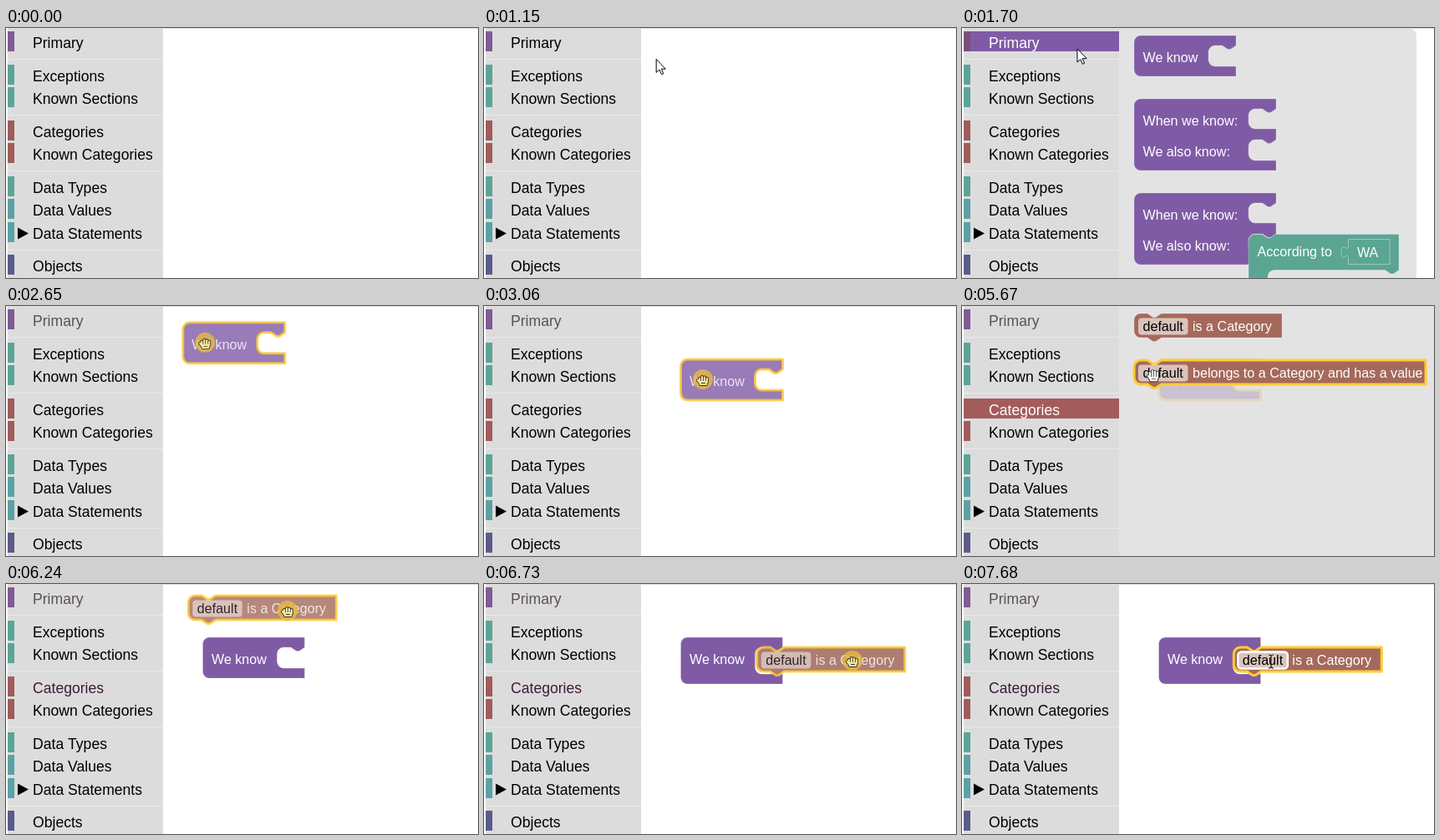
Recreate the animation shown at these times as an HTML page with a canvas. Size 565 px wide and 300 px high, loop 8000 ms.

```html
<!DOCTYPE html>
<html>
<head>
<meta charset="utf-8">
<style>
html, body { margin: 0; overflow: hidden; background: #fff; }
canvas { display: block; }
</style>
</head>
<body>
<canvas id="stage" width="565" height="300"></canvas>
<script>
const ctx = document.getElementById('stage').getContext('2d');
const LOOP = 8000;
const PURPLE = '#805ba5', BROWN = '#a5695b', GREEN = '#5ba593', YELLOW = '#fc3';
const MENU_FONT = '17.6px "Liberation Sans", Arial, sans-serif';
const BLOCK_FONT = '16.1px "Liberation Sans", Arial, sans-serif';

// label, top of row, colour of tab
const menu = [
  ['Primary', 4, '#805b94'],
  ['Exceptions', 44, '#5ba596'], ['Known Sections', 71, '#5ba596'],
  ['Categories', 111, '#a05b5b'], ['Known Categories', 138, '#a05b5b'],
  ['Data Types', 178, '#5ba596'], ['Data Values', 205, '#5ba2a5'], ['Data Statements', 233, '#5ba2a5'],
  ['Objects', 272, '#5b5b8a']
];

// time, x, y of the pointer
const route = [
  [600, 506, 92], [1360, 138, 25], [1970, 138, 25], [2310, 233, 35],
  [2520, 233, 35], [3000, 262, 89], [4120, 262, 89], [4610, 166, 121],
  [5400, 166, 121], [6030, 325, 28], [6239, 325, 28], [6240, 337, 33],
  [6700, 441, 93], [7000, 441, 93], [7300, 405, 58], [7640, 370, 93]
];

const within = (t, a, b) => t >= a && t < b;

function follow(t) {
  let i = 0;
  while (i < route.length - 1 && t >= route[i + 1][0]) i++;
  const a = route[i], b = route[i + 1] || a;
  let k = b === a ? 0 : (t - a[0]) / (b[0] - a[0]);
  k = Math.max(0, k);
  k = k * k * (3 - 2 * k);
  return { x: a[1] + (b[1] - a[1]) * k, y: a[2] + (b[2] - a[2]) * k };
}

function rect(x, y, w, h, color) {
  ctx.fillStyle = color;
  ctx.fillRect(x, y, w, h);
}

function text(s, x, y, color = '#fff', font = BLOCK_FONT) {
  ctx.font = font;
  ctx.fillStyle = color;
  ctx.fillText(s, x, y);
}

function at(x, y, draw) {
  ctx.save();
  ctx.translate(x, y);
  draw();
  ctx.restore();
}

// Block outline; holes are [top, bottom] pairs open to the right.
function outline(w, h, { left = 0, holes = [], top = false, tail = false }) {
  const p = new Path2D();
  p.moveTo(0, 8);
  p.arcTo(0, 0, 8, 0, 8);
  if (top) for (const [x, y] of [[16, 0], [22.6, 4.4], [25.9, 4.4], [32.5, 0]]) p.lineTo(x, y);
  p.lineTo(w, 0);
  for (const [a, b] of holes) {
    for (const [dx, dy] of [[0, 0], [6.6, 4.4], [9.9, 4.4], [16.5, 0]]) p.lineTo(w - dx, a + dy);
    p.arcTo(left, a, left, b, 8);
    p.arcTo(left, b, w, b, 8);
    p.lineTo(w, b);
  }
  p.lineTo(w, h);
  if (tail) for (const [x, y] of [[32.5, 0], [25.9, 4.4], [22.6, 4.4], [16, 0]]) p.lineTo(x, h + y);
  p.arcTo(0, h, 0, 0, 8);
  p.closePath();
  return p;
}

function paint(path, color, selected) {
  ctx.fillStyle = color;
  ctx.fill(path);
  ctx.lineJoin = 'round';
  ctx.lineWidth = selected ? 3 : 1;
  ctx.strokeStyle = selected ? YELLOW : 'rgba(255,255,255,.25)';
  ctx.stroke(path);
}

function weKnow(x, y, { selected = false, alpha = 1, grown = 0 } = {}) {
  at(x, y, () => {
    ctx.globalAlpha = alpha;
    paint(outline(122, 49 + grown, { left: 89, holes: [[12, 37 + grown]] }), PURPLE, selected);
    text('We know', 10.5, 32);
  });
}

function whenWeKnow(y) {
  at(206, y, () => {
    paint(outline(170, 86, { left: 137, holes: [[12, 36], [49, 74]] }), PURPLE);
    text('When we know:', 10.5, 32);
    text('We also know:', 10.5, 69);
  });
}

function accordingTo() {
  at(343, 247.5, () => {
    paint(outline(180, 120, { left: 23, holes: [[43, 100]], top: true }), GREEN);
    text('According to', 10.5, 26.5);
    ctx.strokeStyle = '#9cc9be';
    ctx.beginPath();
    ctx.moveTo(119.5, 14);
    ctx.lineTo(119.5, 6);
    ctx.lineTo(169, 6);
    ctx.lineTo(169, 36);
    ctx.lineTo(119.5, 36);
    ctx.lineTo(119.5, 28);
    ctx.bezierCurveTo(119.5, 20, 111, 36, 111, 21);
    ctx.bezierCurveTo(111, 9, 119.5, 22, 119.5, 14);
    ctx.stroke();
    text('WA', 130, 27.5);
  });
}

function fact(x, y, label, w, { selected = false, alpha = 1, editing = false } = {}) {
  at(x, y, () => {
    ctx.globalAlpha = alpha;
    paint(outline(w, 29, { top: true, tail: true }), BROWN, selected);
    ctx.beginPath();
    ctx.roundRect(5, 5.5, 59.5, 20, 4);
    ctx.fillStyle = 'rgba(255,255,255,.6)';
    ctx.fill();
    if (editing) {
      ctx.strokeStyle = '#fff';
      ctx.lineWidth = 2.5;
      ctx.stroke();
    }
    text('default', 10.5, 21, '#000');
    text(label, 70, 21);
  });
}

function sidebar(t, pointer) {
  rect(188, 0, 377, 1, '#ddd');
  rect(2, 0, 186, 300, '#dcdcdc');
  for (const y of [37, 104, 171, 266]) rect(2, y, 186, 1, '#e9e9e9');
  for (const [label, y, color] of menu) {
    const first = label === 'Primary', cats = label === 'Categories';
    const open = first && within(t, 1630, 2520) || cats && within(t, 5130, 6240);
    const hover = pointer && pointer.x < 188 && within(pointer.y, y, y + 24);
    let ink = '#000';
    if (first && t >= 2520) ink = '#5c5156';
    if (cats && t >= 6240) ink = '#3d1a35';
    if (open) ink = '#fff';
    if (open) rect(10, y, 178, 24, first ? PURPLE : '#a55b5b');
    else if (hover) rect(10, y, 178, 24, '#e4e4e4');
    rect(2, y, 8, 24, open && first ? '#77507a' : color);
    text(label, 32, y + 20, ink, MENU_FONT);
  }
  ctx.fillStyle = '#000';
  ctx.fill(new Path2D('M14 239.5L27 246.5L14 253.5Z'));
}

function panel(width) {
  ctx.fillStyle = 'rgba(221,221,221,.8)';
  ctx.beginPath();
  ctx.roundRect(188, 1, width, 310, [0, 8, 8, 0]);
  ctx.fill();
}

function arrow() {
  const p = new Path2D('M0 0V16L3.7 12.6L6.3 18.3L8.6 17.3L6.2 11.7H11.2Z');
  ctx.fillStyle = '#fff';
  ctx.fill(p);
  ctx.lineWidth = 1;
  ctx.strokeStyle = '#000';
  ctx.stroke(p);
}

function hand(closed) {
  const reach = closed ? 2 : 0;
  const p = new Path2D();
  for (const [x, y] of [[-4, -4], [-1, -6], [2, -5.5], [5, -4]]) {
    p.moveTo(x, y + reach);
    p.lineTo(x, 2);
  }
  p.moveTo(-6, 0);
  p.lineTo(-3, 4);
  p.rect(-3, 2, 7, 3);
  ctx.lineCap = ctx.lineJoin = 'round';
  for (const [color, width] of [['#333', 4], [closed ? '#fbe6a0' : '#fff', 2.2]]) {
    ctx.strokeStyle = color;
    ctx.lineWidth = width;
    ctx.stroke(p);
  }
}

function beam() {
  ctx.strokeStyle = '#222';
  ctx.lineWidth = 1.2;
  ctx.stroke(new Path2D('M-3 -8Q0 -8 0 -6Q0 -8 3 -8M0 -7V7M-3 8Q0 8 0 6Q0 8 3 8'));
}

function cursor(t, pointer, shape) {
  const dragging = within(t, 2450, 3330) || within(t, 6240, 6800);
  const pressed = dragging || within(t, 1430, 1560) || within(t, 4940, 5070);
  at(pointer.x, pointer.y, () => {
    if (pressed) {
      ctx.fillStyle = 'rgba(230,188,60,.8)';
      ctx.beginPath();
      ctx.arc(0, -1, 12, 0, 7);
      ctx.fill();
    }
    if (dragging || shape === 'hand') hand(dragging);
    else if (shape === 'beam') beam();
    else arrow();
  });
}

function draw(t) {
  const pointer = t >= 600 ? follow(t) : null;
  const over = (x, y, w, h) => pointer && within(pointer.x, x, x + w) && within(pointer.y, y, y + h);
  let shape = 'arrow';
  rect(0, 0, 565, 300, '#fff');
  sidebar(t, pointer);

  if (t >= 2520) {
    const held = t < 3330;
    const grown = t >= 6600 ? 7 : 0;
    const pos = t < 3000 ? { x: pointer.x - 26.5, y: pointer.y - 25 } : { x: 235.5, y: 64 };
    weKnow(pos.x, pos.y, { selected: t < 6240, alpha: held ? .8 : 1, grown });
    if (t < 5130 && over(pos.x, pos.y, 122, 49)) shape = 'hand';
  }

  if (within(t, 1630, 2520)) {
    panel(356);
    const selected = over(206, 9, 122, 49);
    if (selected) shape = 'hand';
    weKnow(206, 9, { selected });
    whenWeKnow(85);
    whenWeKnow(198);
    accordingTo();
  }

  if (within(t, 5130, 6240)) {
    panel(390);
    const a = over(206, 9, 177, 29), b = over(206, 65, 349, 29);
    if (a || b) shape = 'hand';
    fact(206, 9, 'is a Category', 177, { selected: a });
    fact(206, 65, 'belongs to a Category and has a value', 349, { selected: b });
  }

  if (t >= 6240) {
    const held = t < 6800;
    let x = 325.3, y = 76;
    if (held) {
      const k = (pointer.x - 337) / 104;
      x = 218.3 + 108.5 * k;
      y = 14 + 62 * (pointer.y - 33) / 60;
      if (t >= 6600) at(325.3, 76, () => {
        ctx.fillStyle = 'rgba(0,0,0,.2)';
        ctx.fill(outline(177, 29, { top: true, tail: true }));
      });
    }
    const editing = !held && over(x + 4, y + 4, 61, 22);
    if (editing) shape = 'beam';
    else if (over(x, y, 177, 29)) shape = 'hand';
    fact(x, y, 'is a Category', 177, { selected: true, alpha: held ? .8 : 1, editing });
  }

  if (pointer) cursor(t, pointer, shape);
}

function frame() {
  draw(performance.now() % LOOP);
  requestAnimationFrame(frame);
}
frame();
</script>
</body>
</html>
```
